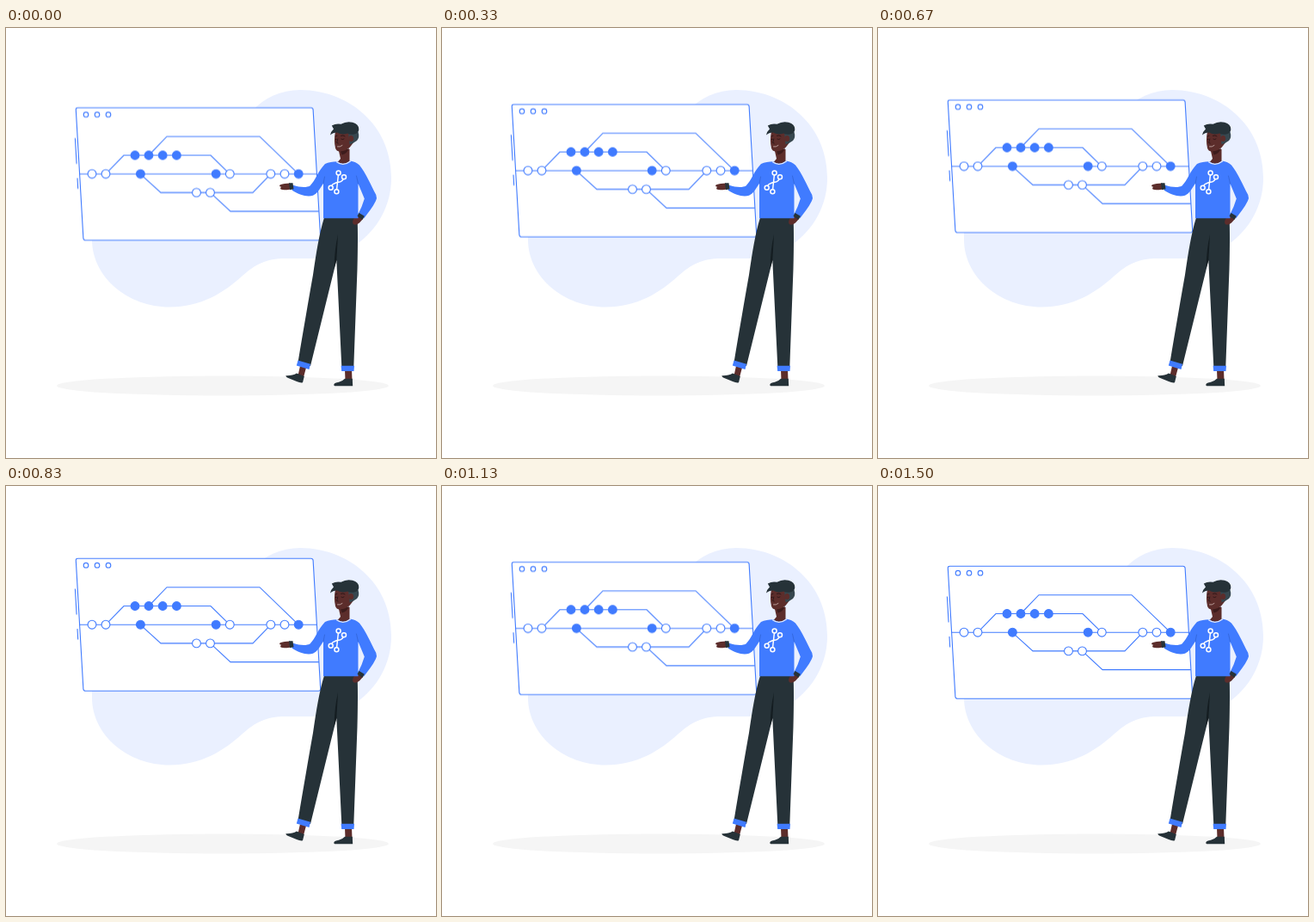
An HTML page that plays this animation: 500 px wide and 500 px high, repeating every 1540 ms.

```html
<!DOCTYPE html>
<html lang="en">
<head>
<meta charset="utf-8">
<title>Branch presentation</title>
<style>
  html, body { margin: 0; width: 100%; height: 100%; overflow: hidden; background: #fff; }
  svg { display: block; width: 100vw; height: 100vh; }
  .board { fill: none; stroke: #407bff; stroke-width: 1.1; animation: float 1540ms infinite; }
  .open { fill: #fff; }
  .full { fill: #407bff; }
  .blue { fill: #407bff; }
  .dark { fill: #263238; }
  .skin { fill: #5c2d2b; }
  .line { fill: none; stroke-linecap: round; stroke-linejoin: round; }

  /* linear bob, advanced at 24 steps per second */
  @keyframes float {
    0% { transform: translateY(-.54px); animation-timing-function: steps(17); }
    45.946% { transform: translateY(-10px); animation-timing-function: steps(20); }
    100% { transform: translateY(.526px); }
  }
</style>
</head>
<body>
<svg viewBox="0 0 500 500">
  <path fill="#eaf0ff" d="M286 97C300 81 320 72 342 72C372 72 401 84 420 104C438 122 448 147 448 175C448 205 433 234 407 252C391 263 374 268 354 268H325C302 268 290 275 275 288C253 308 227 324.500 190 324.500C142 324.500 100 290 100 246V180Z"/>
  <ellipse cx="252" cy="416" rx="193" ry="11.500" fill="#f5f5f5"/>

  <g class="board">
    <path class="open" d="M83.500 93.200H354.700Q356.900 93.200 357.100 95.400L365.700 245Q365.800 247.300 363.500 247.300H92.400Q90.100 247.300 89.900 245L81.300 95.400Q81.200 93.200 83.500 93.200Z"/>
    <path d="M80.400 128.500L82.100 158.500M83 175L83.700 187.500"/>
    <g class="open">
      <circle cx="93" cy="101.200" r="2.800"/>
      <circle cx="106" cy="101.200" r="2.800"/>
      <circle cx="119" cy="101.200" r="2.800"/>
    </g>
    <path d="M85.700 170.200H361.400M116 170.200L137 148.500H238L260 170.200M166 148.500L187 126.700H295L340 170.200M156 170.200L180 191.900H287L308 170.200M237.500 191.900L261 213.600H363.900"/>
    <g class="open">
      <circle cx="100" cy="170.200" r="4.900"/>
      <circle cx="116" cy="170.200" r="4.900"/>
      <circle cx="260.300" cy="170.200" r="4.900"/>
      <circle cx="307.800" cy="170.200" r="4.900"/>
      <circle cx="324" cy="170.200" r="4.900"/>
      <circle cx="221.500" cy="191.900" r="4.900"/>
      <circle cx="237.500" cy="191.900" r="4.900"/>
    </g>
    <g class="full">
      <circle cx="156.400" cy="170.200" r="4.900"/>
      <circle cx="244.200" cy="170.200" r="4.900"/>
      <circle cx="340.200" cy="170.200" r="4.900"/>
      <circle cx="150" cy="148.500" r="4.900"/>
      <circle cx="166" cy="148.500" r="4.900"/>
      <circle cx="182.200" cy="148.500" r="4.900"/>
      <circle cx="198.400" cy="148.500" r="4.900"/>
    </g>
  </g>

  <!-- legs -->
  <path class="skin" d="M342 393L349 395L346 406L339.500 404ZM394 397H402L402.500 410H394.500Z"/>
  <path class="dark" d="M325.300 404.200Q333 404.500 338 401.500L346.800 405L345 412.300Q342 412.800 338 411L327 406.500Q325.500 405.500 325.300 404.200ZM381.300 414.500Q382 412.500 387 411.800Q391 411 394 407.800H402.800L403.200 416.200H382.300Q381.200 416 381.300 414.500Z"/>
  <path class="dark" d="M370 220.500H408.500Q409.500 240 408.500 280L404.300 394H390.300L384.300 270L354 393L339.500 389C346 350 352 315 357 287C361 260 364 240 370 220.500Z"/>
  <path fill="#141d21" d="M386 240Q382 257 381.500 280L384.300 270Z"/>
  <path class="blue" d="M339.500 386.500L354 390.700L352.500 397L337.800 392.500ZM389.600 392.800H405L404.500 399H390.200Z"/>

  <!-- arms, torso and neck -->
  <path class="skin" d="M330 180.600L324 181Q318.500 181.700 318 183.300Q318 184.500 320 184.700Q318.300 186.200 319.500 187.500Q322 189 330 187.700ZM411 217.500L404.500 221.500Q402 226 404 228.300Q407 229.700 411 226.500L415.500 221.500Z"/>
  <path class="skin" d="M386.500 141H399.500V155Q397 159.500 391.500 159Q387 158.500 386 155.500L389 152Z"/>
  <path class="blue" d="M385.500 155.300Q392 160.500 400 154.500Q407 155.500 411 159.500C418 168 424 182 430.300 194Q431.700 197.500 430 201C426 209 421 215 416.300 221.200L409.300 216.800Q414 208 416.800 198.500L409.500 181V221.300H369V180.500C365 187 361.500 193 357 194.700C350 197.200 340 193.500 332.500 188.500L334 182.700C341 185 349 186 353.500 183.500C360 177 363 166 371 158Q377 155.300 385.500 155.300Z"/>
  <path class="line" d="M384.500 155.800Q392 161.300 400.500 155" stroke="#e3ebff" stroke-width="1.200"/>
  <path class="line" d="M409.500 181L407.500 172M369 181L370.500 173" stroke="#2f60d0" stroke-width=".7"/>
  <path class="dark" d="M329 180.300L333.500 180.200L334.500 187.200L330 188.200ZM410.500 215L416.800 218.700L414.500 222.800L408.500 218.800Z"/>

  <!-- branch pictogram -->
  <g class="line" stroke="#fff" stroke-width="1.500">
    <path d="M386.400 171L384.600 187.500M392 175.700C390.500 180 387 178.500 382.500 180.500Q379.500 181.500 378.600 183.500"/>
    <circle cx="386.600" cy="168.500" r="2.500"/>
    <circle cx="393" cy="173.300" r="2.500"/>
    <circle cx="377.700" cy="185.800" r="2.500"/>
    <circle cx="384.400" cy="190.200" r="2.500"/>
  </g>

  <!-- head -->
  <path class="skin" d="M383 120C381.500 128 381.700 134 383 139.500Q384 143.500 388 143.500Q394 143.500 399.500 139L405 132V119Z"/>
  <path fill="#3d1c1c" d="M389 143.500Q395 143 399 139.500Q397 146 390.500 147.500Z"/>
  <path fill="#37474f" d="M398 121H409.500Q411.500 127 408 131Q404 134 399.500 135.500Z"/>
  <path class="dark" d="M377 124.500Q378 120 381 117.500L378.800 113.500Q384 110.500 389.500 111.800Q396 108 403 109.800Q410.500 112 410.300 118Q410 122.500 405 123.500Q400 124.500 397 122.500Q391 125 385 121.500Q380 121.500 377 124.500Z"/>
  <ellipse class="skin" cx="401.300" cy="128.500" rx="2.800" ry="3.600"/>
  <g class="line" stroke="#2b1517" stroke-width=".9">
    <path d="M383.200 126L385 125.300M389.500 125.300Q392 124.200 394 125.800M390 129.200Q391.700 130.300 393 129M383.200 129.500L384.500 129.300M385.800 129L384.500 133.500L386.200 134"/>
    <path d="M385.500 138Q388.500 138.700 391 136.500" stroke="#dfc9c6" stroke-width=".7"/>
  </g>
</svg>
</body>
</html>
```
